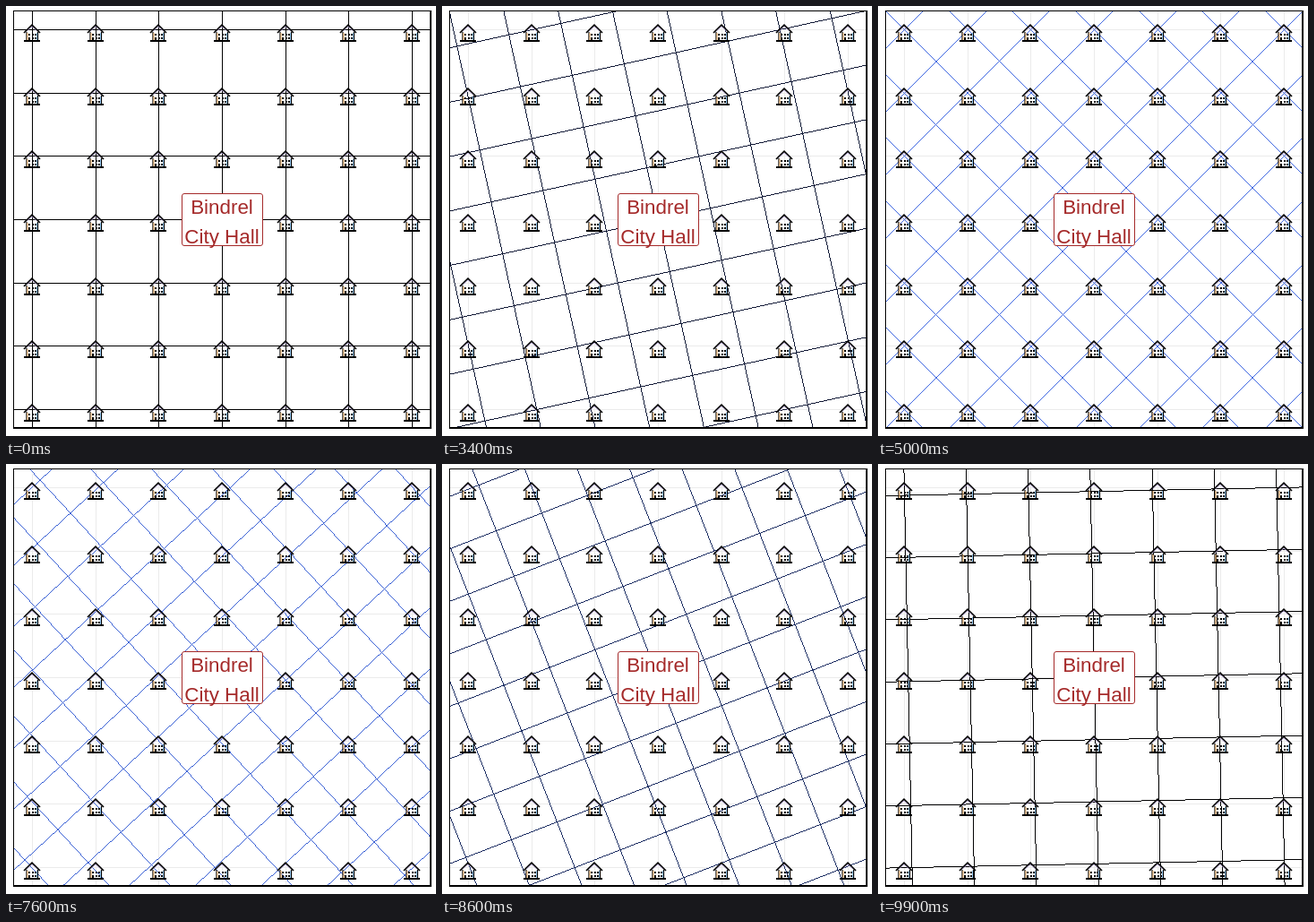
These frames come from a looping animation (480 px wide and 480 px high, 10000 ms). An HTML page with a canvas:

```html
<!DOCTYPE html>
<html lang="en">
<head>
<meta charset="utf-8">
<title>Turning street grid</title>
<style>
  html, body { margin: 0; width: 100%; height: 100%; overflow: hidden; background: #fff; }
  canvas, svg { position: absolute; left: 0; top: 0; width: 100vw; height: 100vh; }
  canvas { image-rendering: pixelated; }
  .crisp { shape-rendering: crispEdges; }
  text { font: 22.4px "Liberation Sans", Arial, sans-serif; fill: #a52a2a; text-anchor: middle; }
</style>
</head>
<body>
<canvas id="map" width="480" height="480"></canvas>
<svg viewBox="0 0 480 480">
  <defs>
    <g id="house">
      <path d="M-6 -1V9M6.5 -1V9" stroke="#000" stroke-width="1.2"/>
      <path d="M-5 0V8" stroke="#f3b163"/>
      <path d="M5.4 0V8" stroke="#8fc8f5"/>
      <path d="M-9 0L0 -8.8L9 0" fill="none" stroke="#000" stroke-width="1.7"/>
      <path d="M-5.5 -2L0 -7L5.5 -2" fill="none" stroke="#b9a8dc" stroke-width=".8"/>
      <path class="crisp" d="M-9 8H9V10H-9ZM-4 1H-2V3H-4ZM0 1H2V3H0ZM3 1H5V3H3ZM-4 5H-2V8H-4ZM0 5H2V7H0ZM3 5H5V7H3Z"/>
    </g>
  </defs>
  <g id="houses"></g>
  <path class="crisp" fill-rule="evenodd" d="M8 5H475V472H8ZM9 6V470H473V6Z"/>
  <rect x="196.5" y="209.5" width="90" height="58" rx="2.5" fill="#fff" stroke="#a52a2a"/>
  <text x="241" y="232">Bindrel</text>
  <text x="241" y="265">City Hall</text>
</svg>
<script>
const CENTER = { x: 241, y: 238 };
const PANEL = { left: 9, top: 6, right: 473, bottom: 470 };
const BLOCK = 212 / 3;
const STEPS = 25, STEP_MS = 100, HOLD_MS = 2500, LOOP_MS = 10000;
const BLUE = [65, 105, 225];

const map = document.getElementById("map").getContext("2d");
const houses = document.getElementById("houses");

for (let i = -3; i <= 3; i++) {
  for (let j = -3; j <= 3; j++) {
    const house = document.createElementNS("http://www.w3.org/2000/svg", "use");
    house.setAttribute("href", "#house");
    house.setAttribute("x", Math.round(CENTER.x + i * BLOCK));
    house.setAttribute("y", Math.round(CENTER.y + j * BLOCK) + 4);
    houses.append(house);
  }
}

// Draws an endless line one hard pixel wide through (x, y) along (dx, dy).
function hardLine(x, y, dx, dy) {
  if (Math.abs(dx) >= Math.abs(dy)) {
    for (let px = PANEL.left; px < PANEL.right; px++) {
      map.fillRect(px, Math.round(y + (px - x) * dy / dx), 1, 1);
    }
  } else {
    for (let py = PANEL.top; py < PANEL.bottom; py++) {
      map.fillRect(Math.round(x + (py - y) * dx / dy), py, 1, 1);
    }
  }
}

// The axis (a, -b) and its perpendicular (b, a) set both turn and spacing.
function drawGrid(a, b, reach) {
  for (let k = -reach; k <= reach; k++) {
    const d = k * BLOCK;
    hardLine(CENTER.x + d * b, CENTER.y + d * a, a, -b);
    hardLine(CENTER.x + d * a, CENTER.y - d * b, b, a);
  }
}

// Steps taken towards the diagonal layout at a time in the loop.
function stepAt(time) {
  const half = LOOP_MS / 2;
  const step = Math.max(0, Math.floor((time % half - HOLD_MS) / STEP_MS));
  return time < half ? step : STEPS - step;
}

let shown = -1;
function draw(step) {
  if (step === shown) return;
  shown = step;
  const t = step / STEPS;
  map.clearRect(0, 0, 480, 480);
  map.save();
  map.beginPath();
  map.rect(PANEL.left, PANEL.top, PANEL.right - PANEL.left, PANEL.bottom - PANEL.top);
  map.clip();
  map.fillStyle = "#ebebeb";
  drawGrid(1, 0, 3);
  // Street ends move straight to their turned, shrunken places.
  map.fillStyle = `rgb(${BLUE.map(c => Math.round(c * t ** 1.4))})`;
  drawGrid(1 - t / 2, t / 2, t ? 8 : 3);
  map.restore();
}

const start = performance.now();
function frame() {
  draw(stepAt((performance.now() - start) % LOOP_MS));
  requestAnimationFrame(frame);
}
draw(0);
requestAnimationFrame(frame);
</script>
</body>
</html>
```
